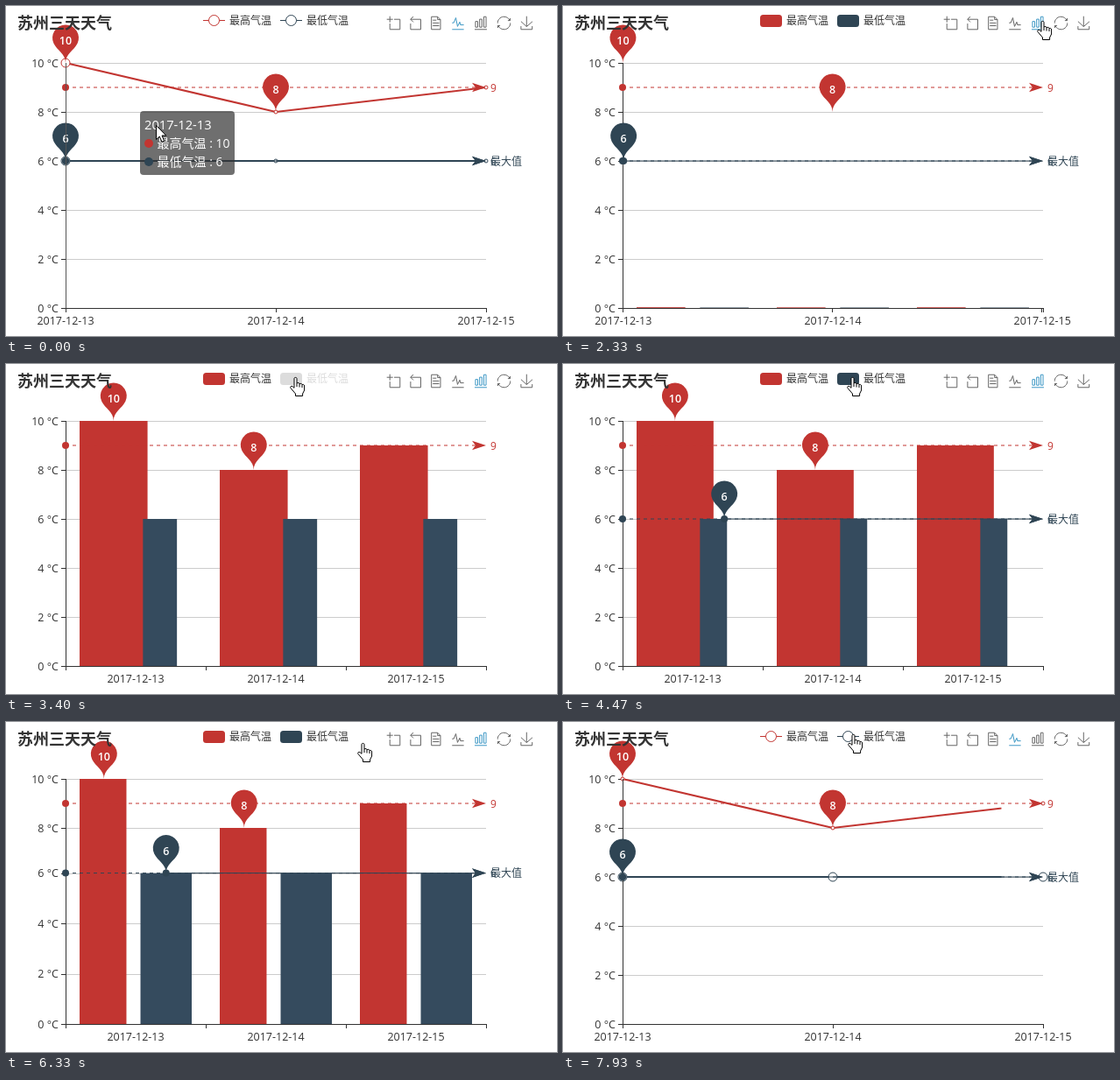
Recreate the animation shown at these times as an HTML page. Size 629 px wide and 377 px high, loop 8 s.

```html
<!DOCTYPE html>
<html lang="zh-CN">
<head>
<meta charset="utf-8">
<title>天气图表</title>
<style>
html, body { margin: 0; width: 100%; height: 100%; overflow: hidden; background: #fff; }
svg { display: block; width: 629px; height: 377px; font-family: "Open Sans", "Noto Sans CJK SC", "Noto Sans CJK", sans-serif; }
text { white-space: pre; }
</style>
</head>
<body>
<svg id="stage" viewBox="0 0 629 377"></svg>
<script>
const LOOP = 8000;
const RED = '#c23531', BLUE = '#2f4554', RED_HOT = '#d63a35', BLUE_HOT = '#354b5e';
const LEFT = 68, RIGHT = 548, TOP = 65, BASE = 345;
const DATES = ['2017-12-13', '2017-12-14', '2017-12-15'];
const HIGH = [10, 8, 9], LOW = 6;
const BAR = 128 / 2.3, GROW = 128 - BAR;

// Moments of the clicks
const TO_BAR = 2330, BLUE_OFF = 3367, BLUE_ON = 4400, RED_OFF = 5167, RED_ON = 6133, TO_LINE = 7000;

// time, x, y of the pointer's hot spot
const PATH = [
  [0, 171, 136], [70, 171, 136], [600, 428, 160], [850, 539, 171], [930, 560, 163],
  [1200, 566, 110], [1450, 546, 80], [1730, 541, 18], [1800, 547, 18], [2060, 547, 18],
  [2070, 547, 17], [2620, 547, 17], [3270, 330, 15], [4700, 330, 15], [4930, 238, 10],
  [6140, 238, 10], [6330, 407, 24], [6730, 520, 18], [7200, 520, 18], [7790, 331, 14], [LOOP, 331, 14]
];
// point index, hover start, hover end
const HOVERS = [[0, -500, 105], [1, 105, 600], [2, 600, 860], [2, 1425, 1520]];

const ICONS = [
  [442.5, 'M0 13.5h26.9M13.5 26.9V0M32.1 13.5H58V58H13.5V32.1'],
  [467, 'M22 1.4L9.9 13.5l12.3 12.3M10.3 13.5h44.6v44.6H10.3v-26'],
  [490.5, 'M17.5 17.3H33M45.4 29.5h-28M11.5 2v56H51V14.8L38.4 2zM38.4 2.2v12.7H51M45.4 41.7h-28'],
  [516, 'M4.1 28.9h7.1l9.3-22 7.4 38 9.7-19.7 3 12.8h14.9M4.1 58h51.4'],
  [542, 'M6.7 22.9h10V48h-10zM24.9 13h10v35h-10zM43.2 2h10v46h-10zM3.1 58h53.7'],
  [568.5, 'M47 18.9h9.8V8.7M56.3 20.1C52.1 9 40.5.6 26.8 2.1 12.6 3.7 1.6 16.2 2.1 30.6M13 41.1H3.1v10.2M3.7 39.9c4.2 11.1 15.8 19.5 29.5 18 14.2-1.6 25.2-14.1 24.7-28.5'],
  [594.5, 'M4.7 22.9l24.6 22.6 25.4-22.1M4.6 43.6V58h49.2V43.6M29.2 45.1V0']
];

const clamp = k => Math.min(1, Math.max(0, k));
const mix = (a, b, k) => a + (b - a) * k;
const cubicOut = k => 1 - (1 - clamp(k)) ** 3;
const elasticOut = k => k <= 0 ? 0 : k >= 1 ? 1 : 2 ** (-10 * k) * Math.sin((k - 0.1) * 5 * Math.PI) + 1;
const between = (t, a, b) => t >= a && t < b;
// Rises to 1 after `on` and falls back after `off`
const pulse = (t, on, off) => cubicOut((t - on) / 300) - cubicOut((t - off) / 300);

const line = (x1, y1, x2, y2, color, extra = '') =>
  `<line x1="${x1}" y1="${y1}" x2="${x2}" y2="${y2}" stroke="${color}" ${extra}/>`;
const rect = (x, y, w, h, fill, extra = '') =>
  `<rect x="${x}" y="${y}" width="${Math.max(0, w)}" height="${Math.max(0, h)}" fill="${fill}" ${extra}/>`;
const dot = (x, y, r, fill, stroke = 'none') =>
  `<circle cx="${x}" cy="${y}" r="${Math.max(0, r)}" fill="${fill}" stroke="${stroke}"/>`;
const text = (x, y, str, { size = 12.5, fill = '#333', anchor = 'start', weight = 400 } = {}) =>
  `<text x="${x}" y="${y}" font-size="${size}" fill="${fill}" text-anchor="${anchor}" font-weight="${weight}">${str}</text>`;

function pointer(t) {
  const i = Math.max(1, PATH.findIndex(p => p[0] > t));
  const [a, b] = [PATH[i - 1], PATH[i]];
  const k = (t - a[0]) / (b[0] - a[0]);
  return { x: mix(a[1], b[1], k), y: mix(a[2], b[2], k) };
}

const nearest = x => x < 188 ? 0 : x < 428 ? 1 : 2;
const tipWidth = i => i ? 100 : 108;

function tooltip(t) {
  if (!(t < 1030 || between(t, 1425, 1620))) return '';
  let x = 153, y = 120, goal = { x, y }, index = 0;
  // The box trails the pointer and flips to its left near the edge
  for (let s = 10; s <= t; s += 10) {
    const p = pointer(s);
    if (p.x <= RIGHT && p.y >= TOP) {
      index = nearest(p.x);
      const w = tipWidth(index);
      goal = { x: p.x + 20 + w > 629 ? p.x - 20 - w : p.x + 20, y: p.y + 20 };
    }
    x += (goal.x - x) * 0.16;
    y += (goal.y - y) * 0.16;
  }
  const row = (dy, color, label) =>
    dot(10, dy, 5, color) + text(19.5, dy + 5, label, { size: 14, fill: '#fff' });
  return `<g transform="translate(${Math.round(x)} ${Math.round(y)})">` +
    rect(0, 0, tipWidth(index), 73, 'rgba(50,50,50,.7)', 'rx="4"') +
    text(5, 21, DATES[index], { size: 14.7, fill: '#fff' }) +
    row(37, RED, '最高气温 : ' + HIGH[index]) + row(58, BLUE, '最低气温 : ' + LOW) + '</g>';
}

function pin(x, y, color, label) {
  const r = 15, drop = r * r / 35, cy = y - 35 + drop, a = Math.asin(drop / r);
  const dx = Math.cos(a) * r, sx = dx - Math.sin(a) * 9, sy = cy + drop + Math.cos(a) * 9;
  return `<path fill="${color}" d="M${x - dx} ${cy + drop}A${r} ${r} 0 1 1 ${x + dx} ${cy + drop}` +
    `C${x + sx} ${sy} ${x} ${y - 10.5} ${x} ${y}C${x} ${y - 10.5} ${x - sx} ${sy} ${x - dx} ${cy + drop}"/>` +
    text(x, y - 21, label, { fill: '#fff', anchor: 'middle', weight: 600 });
}

function markLine(x, y, color, label, dashed) {
  return line(x, y, RIGHT - 10, y, color, dashed ? 'stroke-dasharray="4 4"' : '') + dot(x, y, 4, color) +
    `<path fill="${color}" d="M${RIGHT} ${y}l-16 -5.3 4 5.3-4 5.3z"/>` +
    text(553, y + 4.5, label, { size: 12, fill: color });
}

function axes(t, toY, barMix) {
  const narrow = between(t, RED_OFF, RED_ON);
  const fixed = narrow ? [1, 3, 5].map(v => [v, BASE - v * 280 / 6]) : [8, 10].map(v => [v, BASE - v * 28]);
  const ticks = [0, 2, 4, 6].map(v => [v, toY(v)]).concat(fixed);
  let out = '';
  for (const [v, y] of ticks) {
    const row = Math.round(y) + 0.5;
    out += line(LEFT, row, RIGHT, row, '#ccc') + line(63, row, LEFT, row, '#333') +
      text(60, y + 4.5, v + ' °C', { anchor: 'end' });
  }
  const marks = DATES.map((_, i) => LEFT + i * mix(240, 160, barMix));
  if (between(t, TO_BAR, TO_LINE)) marks.push(RIGHT);
  for (const m of marks) {
    const x = Math.round(m) + 0.5;
    out += line(x, BASE, x, BASE + 5, '#333');
  }
  DATES.forEach((d, i) => {
    out += text(mix(LEFT + 240 * i, 148 + 160 * i, barMix), 364, d, { anchor: 'middle' });
  });
  return out;
}

const axisLines = () =>
  line(68.5, TOP, 68.5, BASE + 1, '#333') + line(LEFT, 345.5, RIGHT + 1, 345.5, '#333');

function lineSeries(t, blueHot) {
  const drawn = t < TO_BAR ? 1 : clamp((t - 7030) / 1000);
  const scale = t < TO_BAR ? 1 : clamp((t - TO_LINE) / 900);
  const points = HIGH.map((v, i) => [LEFT + 240 * i, BASE - v * 28]);
  const lowY = BASE - LOW * 28;
  let out = `<clipPath id="reveal"><rect x="66" y="50" width="${2 + 480 * drawn}" height="310"/></clipPath>` +
    `<g clip-path="url(#reveal)" fill="none" stroke-width="2"><polyline points="${points}" stroke="${RED}"/>` +
    line(LEFT, lowY, RIGHT, lowY, BLUE) + '</g>';
  points.forEach(([x, y], i) => {
    let e = 0;
    for (const [index, from, to] of HOVERS)
      if (index === i) e += elasticOut((t - from) / 400) - elasticOut((t - to) / 400);
    if (t > TO_LINE) e = 0;
    out += dot(x, y, (2 + 3 * e) * scale, '#fff', RED) +
      dot(x, lowY, (2 + 3 * (blueHot ? 1 : e)) * scale, '#fff', BLUE);
  });
  return out;
}

function barSeries(t, toY, soloRed, soloBlue, redHot, blueHot) {
  const rise = cubicOut((t - TO_BAR) / 1000);
  const redW = BAR * (1 - soloBlue) + GROW * soloRed;
  const blueW = BAR * (1 - soloRed) + GROW * soloBlue;
  const blueX = 212 - BAR - GROW * soloBlue;
  const blueH = (BASE - toY(LOW)) * rise;
  return HIGH.map((v, i) => {
    const h = v * 28 * rise;
    return rect(84 + 160 * i, BASE - h, redW, h, redHot ? RED_HOT : RED) +
      rect(blueX + 160 * i, BASE - blueH, blueW, blueH, blueHot ? BLUE_HOT : BLUE);
  }).join('');
}

function legend(x, label, color, isBar, off) {
  const fill = off || color;
  const icon = isBar
    ? rect(x, 10, 25, 14, fill, 'rx="3.5"')
    : line(x, 16.5, x + 25, 16.5, fill) + dot(x + 12.5, 16.5, 6, '#fff', fill);
  return icon + text(x + 30, 21.3, label, { size: 12, fill: off || '#333' });
}

function toolbox(t, isBar) {
  return ICONS.map(([x, d], i) => {
    const active = i === (isBar ? 4 : 3) || (i === 4 && between(t, 1690, TO_BAR)) || (i === 3 && between(t, 6690, TO_LINE));
    return `<path d="${d}" transform="translate(${x} 19.5) scale(.26) translate(-30 -30)" fill="none" ` +
      `stroke="${active ? '#3e98c5' : '#666'}" vector-effect="non-scaling-stroke"/>`;
  }).join('');
}

function cursor(t, { x, y }) {
  const hand = t >= 1770;
  const d = hand
    ? 'M5 1.6c0-1.6 3-1.6 3 0V7c1-1 3-.6 3 .8 1-1 3-.4 3 .9 1-.8 2.6-.2 2.6 1.2V15l-2 4v2.5H6.5V19L1 12.5c-1-1.6.8-3 2.2-1.8L5 12.3ZM8 7v4M11 8v3.5M14 9v3'
    : 'M.5.5V16.5L4.3 13 7 19.3 9.6 18.2 7 12H11.8Z';
  return `<path transform="translate(${Math.round(x) - (hand ? 6 : 0)} ${Math.round(y)})" d="${d}" fill="#fff" stroke="#000"/>`;
}

function scene(t) {
  const isBar = between(t, TO_BAR, TO_LINE);
  const barMix = pulse(t, TO_BAR, TO_LINE);
  const soloRed = pulse(t, BLUE_OFF, BLUE_ON);
  const soloBlue = pulse(t, RED_OFF, RED_ON);
  const toY = v => BASE - v * mix(28, 280 / 6, soloBlue);
  const redShown = !between(t, RED_OFF, RED_ON);
  const blueShown = !between(t, BLUE_OFF, BLUE_ON);
  const p = pointer(t);
  const overLegend = p.y < 30 && t > TO_BAR;
  const redHot = overLegend && p.x < 303;
  const blueHot = overLegend && between(p.x, 313, 410);

  let out = axes(t, toY, barMix);
  out += isBar ? barSeries(t, toY, soloRed, soloBlue, redHot, blueHot) : lineSeries(t, blueHot);
  out += axisLines();

  const lowY = toY(LOW);
  const blueX = mix(LEFT, 212 - (BAR + GROW * soloBlue) / 2, barMix);
  const redX = i => mix(LEFT + 240 * i, 84 + 160 * i + (BAR + GROW * soloRed) / 2, barMix);
  if (redShown) out += markLine(LEFT, 93, RED, '9', true);
  if (blueShown) out += markLine(LEFT, lowY, BLUE, '6', true) + markLine(blueX, lowY, BLUE, '最大值');
  if (redShown) out += pin(redX(0), TOP, RED, 10) + pin(redX(1), 121, RED, 8);
  if (blueShown) out += pin(blueX, lowY, BLUE, 6);

  if (t < 860 || between(t, 1425, 1520)) {
    const x = LEFT + 240 * nearest(p.x) + 0.5;
    out += line(x, TOP, x, BASE, '#555');
  }
  out += text(13, 26.3, '苏州三天天气', { size: 18, weight: 700 });
  out += legend(225, '最高气温', RED, isBar, !redShown && '#ccc');
  out += legend(313, '最低气温', BLUE, isBar, !blueShown && '#dcdcdc');
  return out + toolbox(t, isBar) + tooltip(t) + cursor(t, p);
}

const stage = document.getElementById('stage');
const start = performance.now();
function tick() {
  stage.innerHTML = scene((performance.now() - start) % LOOP);
  requestAnimationFrame(tick);
}
tick();
</script>
</body>
</html>
```
